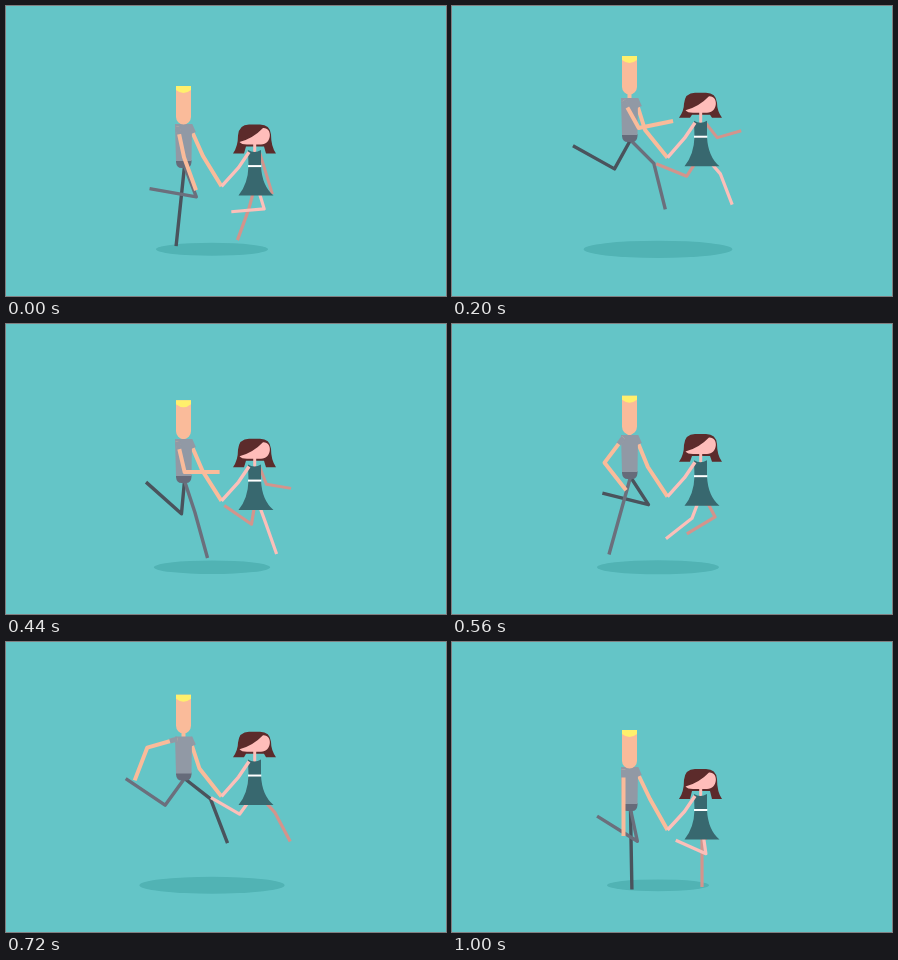
Recreate the animation shown at these times as an HTML page. Size 440 by 290 pixels, loop 1040 ms.

```html
<!DOCTYPE html>
<html lang="en">
<head>
<meta charset="utf-8">
<title>Skipping couple</title>
<style>
  html, body { margin: 0; width: 100%; height: 100%; overflow: hidden; background: #64c5c7; }
  svg { display: block; width: 440px; height: 290px; }
  .limb { fill: none; stroke-linejoin: round; }
</style>
</head>
<body>
<svg id="stage" viewBox="0 0 440 290"></svg>
<script>
const LOOP = 1040, STEP = 40;
const TIMES = [0, 40, 200, 360, 480, 520, 560, 720, 880, 1000];

// Shoulder height of the man; the rest of both bodies follows it.
const SHOULDER = [118, 111, 92, 86, 125, 118, 111, 94.5, 90.5, 125];

// Joint angles in degrees from straight down, positive to the right.
const POSES = {
  manFarLeg: {
    upper: [-6, -15.5, -29, -35, 12, 21, 33, 52, 52, 1],
    lower: [-6, -15.5, -119, -142, -122, -100, -104, 21, 50, 1]
  },
  manNearLeg: {
    upper: [21, 33, 45, 51, 1, -6, -15.5, -36, -40, 12],
    lower: [-100, -104, 14, 41, 1, -6, -15.5, -124, -143, -122]
  },
  manFreeArm: {
    upper: [12, 16, 29, 37, -5, -24, -37, -74, -84, 0],
    lower: [20, 36, 101.6, 119, 70, 52, 38, -21, -79, 0]
  },
  womanFarLeg: {
    upper: [-15, -21, -33, -39, 8, 17, 28, 42, 49, 0],
    lower: [-20, -52, -112, -135, -114, -85, -59, 28, 47, 0]
  },
  womanNearLeg: {
    upper: [17, 28, 41, 49, 0, -17, -21, -36, -44, 8],
    lower: [-85, -59, 21, 45, 0, -21, -52, -120, -132, -114]
  },
  womanFreeArm: {
    upper: [17, 21, 38, 43, 8, 0, -8, -30, -45, 0],
    lower: [17, 34, 106, 125, 50, 25, 8, -5, -8, 0]
  }
};

// Periodic monotone cubic interpolation.
function sample(values, t) {
  const n = TIMES.length;
  const wrap = i => (i + n) % n;
  const span = i => (TIMES[wrap(i + 1)] - TIMES[wrap(i)] + LOOP) % LOOP;
  const slope = i => (values[wrap(i + 1)] - values[wrap(i)]) / span(i);
  const tangent = i => {
    const a = slope(i - 1), b = slope(i);
    return a * b <= 0 ? 0 : 2 * a * b / (a + b);
  };
  let i = n - 1;
  while (TIMES[i] > t) i--;
  const h = span(i), u = (t - TIMES[i]) / h, v = 1 - u;
  return values[i] * (1 + 2 * u) * v * v + values[wrap(i + 1)] * u * u * (3 - 2 * u)
    + h * u * v * (v * tangent(i) - u * tangent(i + 1));
}

const stage = document.getElementById('stage');
function add(tag, attrs) {
  const el = document.createElementNS('http://www.w3.org/2000/svg', tag);
  for (const key in attrs) el.setAttribute(key, attrs[key]);
  return stage.appendChild(el);
}
const shape = fill => add('path', { fill });
const limb = (stroke, width) => add('path', { class: 'limb', stroke, 'stroke-width': width });
const draw = (el, d) => el.setAttribute('d', d);

const SKIN = '#fabb9a', PINK = '#fcbfb9', FAR_PINK = '#d3948c', SHIRT = '#9199a5';

// Creation order is stacking order.
const shadow = add('ellipse', { cx: 206, cy: 243.3, fill: '#51b3b4' });
const manFarLeg = limb('#4a535c', 3.4);
const manNearLeg = limb('#6b6f7c', 3.4);
const manHeldArm = limb(SKIN, 4);
const manHeldSleeve = limb(SHIRT, 5);
const manNeck = limb(SKIN, 4);
const shorts = shape('#666b7a');
const shirt = shape(SHIRT);
const manHead = shape(SKIN);
const manHair = shape('#fff06c');
const womanFarArm = limb(FAR_PINK, 3);
const womanFarLeg = limb(FAR_PINK, 3.2);
const womanNearLeg = limb(PINK, 3.2);
const womanHair = shape('#5c2b2b');
const womanNeck = limb(PINK, 3);
const womanFace = shape('#ffbdba');
const dress = shape('#38686f');
const belt = shape('#ffffff');
const womanHeldArm = limb(PINK, 3.4);
const manFreeArm = limb(SKIN, 4);
const manFreeSleeve = limb(SHIRT, 5);

function reach(x, y, length, degrees) {
  const a = degrees * Math.PI / 180;
  return [x + length * Math.sin(a), y + length * Math.cos(a)];
}

function bend(el, pose, t, x, y, upperLength, lowerLength) {
  const joint = reach(x, y, upperLength, sample(pose.upper, t));
  const end = reach(...joint, lowerLength, sample(pose.lower, t));
  draw(el, `M${x},${y}L${joint}L${end}`);
}

function drawMan(t, s, lift, handY) {
  const head = s - 37 - lift * 0.153, hip = s + 42;
  const elbowX = 198 - lift * 0.15, armX = 171.5, armY = s + 2.5;

  bend(manFarLeg, POSES.manFarLeg, t, 178.5, hip, 33, 47.5);
  bend(manNearLeg, POSES.manNearLeg, t, 178.5, hip, 33, 47.5);
  draw(manHeldArm, `M184,${s + 3}L${elbowX},${s + 32}L215.5,${handY}`);
  draw(manHeldSleeve, `M184,${s + 1}L187.5,${s + 9}`);
  draw(manNeck, `M177.5,${head + 34}V${s + 1}`);
  draw(shorts, `M170,${s + 36}H185.5V${s + 38}Q185,${s + 44} 180,${s + 44}H175.5Q170.5,${s + 44} 170,${s + 38}Z`);
  draw(shirt, `M169,${s}H186L185.5,${s + 37}H170Z`);
  draw(manHead, `M170,${head}H185V${head + 31}A7.5,7.5 0 0 1 170,${head + 31}Z`);
  draw(manHair, `M170,${head}H185V${head + 4}Q177.5,${head + 10} 170,${head + 4}Z`);

  bend(manFreeArm, POSES.manFreeArm, t, armX, armY, 31.5, 35);
  const cuff = reach(armX, armY, 8, sample(POSES.manFreeArm.upper, t));
  draw(manFreeSleeve, `M${armX},${armY}L${cuff}`);
}

function drawWoman(t, s, lift, handY) {
  const top = s + 2 - lift * 0.22, waist = s + 43 - lift * 0.13;
  const tips = top + 30 - lift * 0.15, chin = top + 20, hem = waist + 29.5;

  bend(womanFarArm, POSES.womanFreeArm, t, 253.5, waist - 14, 19, 25);
  bend(womanFarLeg, POSES.womanFarLeg, t, 250, waist + 16, 28, 33);
  bend(womanNearLeg, POSES.womanNearLeg, t, 250, waist + 16, 28, 33);
  draw(womanHair, `M227,${tips}Q232,${tips - 7} 232,${top + 11}Q233,${top} 243,${top}H254`
    + `Q264,${top} 265,${top + 10}Q265,${tips - 7} 270,${tips}H260L258,${top + 22}H240L238,${tips}Z`);
  draw(womanNeck, `M248.7,${chin - 1}V${waist - 13}`);
  draw(womanFace, `M233.5,${top + 17.5}Q247,${top + 14} 257,${top + 3.5}`
    + `C267,${top + 3} 266,${chin} 255,${chin}H241Q235.5,${chin} 233.5,${top + 17.5}Z`);
  draw(dress, `M242,${waist - 16}Q248.5,${waist - 12} 255,${waist - 16}V${waist}`
    + `Q256,${waist + 20} 267.5,${hem}H232.5Q242,${waist + 18} 242.5,${waist}Z`);
  draw(belt, `M242,${waist - 1}H255.3V${waist + 1}H242Z`);
  draw(womanHeldArm, `M243,${waist - 14}L232.5,${waist + 1.5}L215.5,${handY}`);
}

function render(t) {
  const s = sample(SHOULDER, t), lift = 125 - s;
  const handY = s + 63 - lift * 0.1, radius = 51 + lift * 0.71;
  shadow.setAttribute('rx', radius);
  shadow.setAttribute('ry', radius * 0.116);
  drawMan(t, s, lift, handY);
  drawWoman(t, s, lift, handY);
}

const start = performance.now();
function tick() {
  const elapsed = (performance.now() - start) % LOOP;
  render(Math.floor(elapsed / STEP) * STEP);
  requestAnimationFrame(tick);
}
tick();
</script>
</body>
</html>
```
